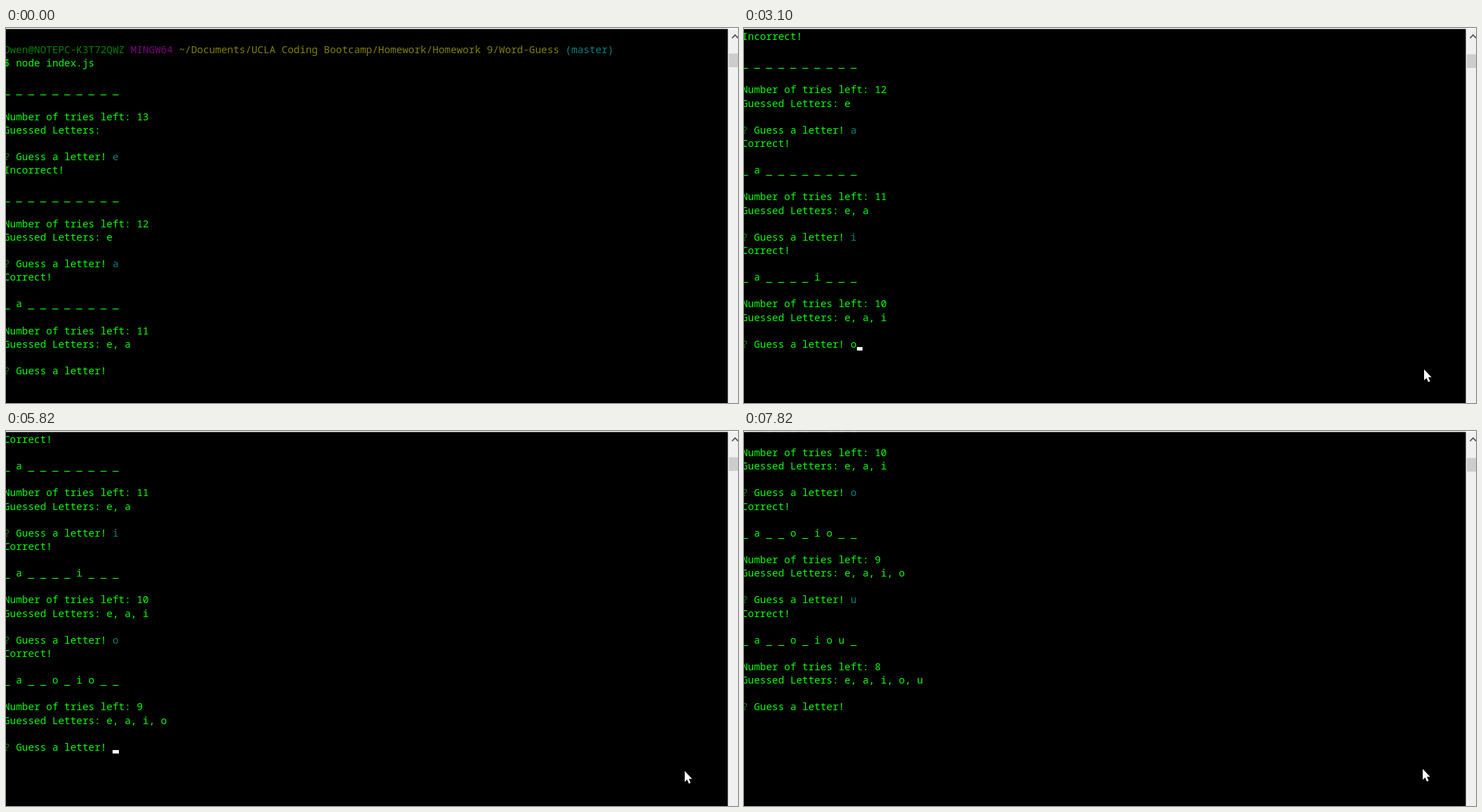
These frames come from a looping animation (1044 by 536 pixels, 8 s). An HTML page with a canvas:

```html
<!DOCTYPE html>
<html lang="en">
<head>
<meta charset="utf-8">
<title>Word guess in a terminal</title>
<style>
  html, body { margin: 0; width: 1044px; height: 536px; overflow: hidden; background: #000; }
  canvas { display: block; }
</style>
</head>
<body>
<canvas id="stage" width="1044" height="536"></canvas>
<script>
const ctx = document.getElementById('stage').getContext('2d');
const LOOP = 8000;
const CELL = 8.61, ROW = 19.12, LEFT = -3, BASELINE = 36.1, UNDERSCORE_DROP = 1;
const LIME = '#00ff00', GREEN = '#008000', TEAL = '#008080', OLIVE = '#808000', PURPLE = '#800080';
const WORD = '_a__o_iou_', GUESSES = 'eaiou', TRIES = 13;

// Each entry changes only the listed parts of the terminal state.
const STEPS = [
  [0,    { scroll: 0, rounds: 2, typed: '', caret: false, thumb: 36.5 }],
  [1380, { caret: true }],
  [1860, { typed: 'i', caret: false }],
  [2160, { scroll: 4, rounds: 3, typed: '' }],
  [2950, { scroll: 7, caret: true, thumb: 37.5 }],
  [3030, { scroll: 10 }],
  [3100, { typed: 'o' }],
  [3480, { caret: false }],
  [4020, { caret: true }],
  [4190, { scroll: 12, rounds: 4, typed: '', caret: false }],
  [4970, { scroll: 15 }],
  [5350, { caret: true }],
  [5820, { scroll: 18 }],
  [5890, { caret: false }],
  [6000, { typed: 'u', caret: true }],
  [6120, { caret: false }],
  [6340, { scroll: 20, rounds: 5, typed: '' }],
  [7180, { scroll: 23 }],
  [7350, { caret: true }],
  [7680, { scroll: 26, caret: false, thumb: 38.5 }],
  [7820, { scroll: 29 }]
];

// Pointer tip: time, x, y.
const POINTER = [
  [530, 978, 528], [610, 970, 508], [690, 962, 488], [760, 964, 476],
  [840, 971, 483], [910, 977, 490], [3030, 973, 489], [3100, 970, 488],
  [3170, 968, 486], [7265, 968, 483]
];

function stateAt(t) {
  return Object.assign({}, ...STEPS.filter(s => s[0] <= t).map(s => s[1]));
}

// A line is a list of [text, colour] spans.
function buildLines({ rounds, typed }) {
  const lines = [
    [['Owen@NOTEPC-K3T72QWZ ', GREEN], ['MINGW64 ', PURPLE],
     ['~/Documents/UCLA Coding Bootcamp/Homework/Homework 9/Word-Guess ', OLIVE], ['(master)', TEAL]],
    [['$ node index.js', LIME]]
  ];
  const print = text => lines.push([[text, LIME]]);
  for (let n = 0; n <= rounds; n++) {
    const guessed = [...GUESSES.slice(0, n)];
    print('');
    print([...WORD].map(c => guessed.includes(c) ? c : '_').join(' '));
    print('');
    print('Number of tries left: ' + (TRIES - n));
    print('Guessed Letters: ' + guessed.join(', '));
    print('');
    const answer = n < rounds ? [GUESSES[n], TEAL] : [typed, LIME];
    lines.push([['?', GREEN], [' Guess a letter! ', LIME], answer]);
    if (n < rounds) print(WORD.includes(GUESSES[n]) ? 'Correct!' : 'Incorrect!');
  }
  return lines;
}

function rect(colour, x, y, w, h) {
  ctx.fillStyle = colour;
  ctx.fillRect(x, y, w, h);
}

function drawTerminal(state) {
  const lines = buildLines(state);
  const baseline = row => Math.round(BASELINE + (row - state.scroll) * ROW);
  const columnX = col => LEFT + col * CELL;
  ctx.font = '500 14.35px "Noto Sans Mono", "DejaVu Sans Mono", monospace';
  lines.forEach((spans, row) => {
    let col = 0;
    for (const [text, colour] of spans) {
      ctx.fillStyle = colour;
      for (const char of text) {
        const drop = char === '_' ? UNDERSCORE_DROP : 0;
        ctx.fillText(char, columnX(col++), baseline(row) + drop);
      }
    }
  });
  if (state.caret) {
    const col = 18 + state.typed.length;
    const x = Math.round(columnX(col));
    rect('#fff', x, baseline(lines.length - 1) - 1, Math.round(columnX(col + 1)) - x, 5);
  }
}

function drawFrame(thumb) {
  rect('#f0f0f0', 1029.5, 0, 14.5, 536);
  rect('#cdcdcd', 1031, thumb, 13, 19.5);
  ctx.strokeStyle = '#505050';
  ctx.lineWidth = 1.8;
  ctx.stroke(new Path2D('M1035.5 14.5L1039.8 10L1044.1 14.5'));
  rect('#fff', 0, 0, 1044, 1.4);
}

function drawPointer(t) {
  const spot = POINTER.filter(p => p[0] <= t).pop();
  if (!spot) return;
  ctx.save();
  ctx.translate(spot[1], spot[2]);
  ctx.fillStyle = '#fff';
  ctx.fill(new Path2D('M0 0V15.5L3.4 12.3L6 18L8.4 17L6 11.3H10.6Z'));
  ctx.restore();
}

function draw(now) {
  const t = now % LOOP;
  const state = stateAt(t);
  rect('#000', 0, 0, 1044, 536);
  drawTerminal(state);
  drawFrame(state.thumb);
  drawPointer(t);
  requestAnimationFrame(draw);
}
requestAnimationFrame(draw);
</script>
</body>
</html>
```
